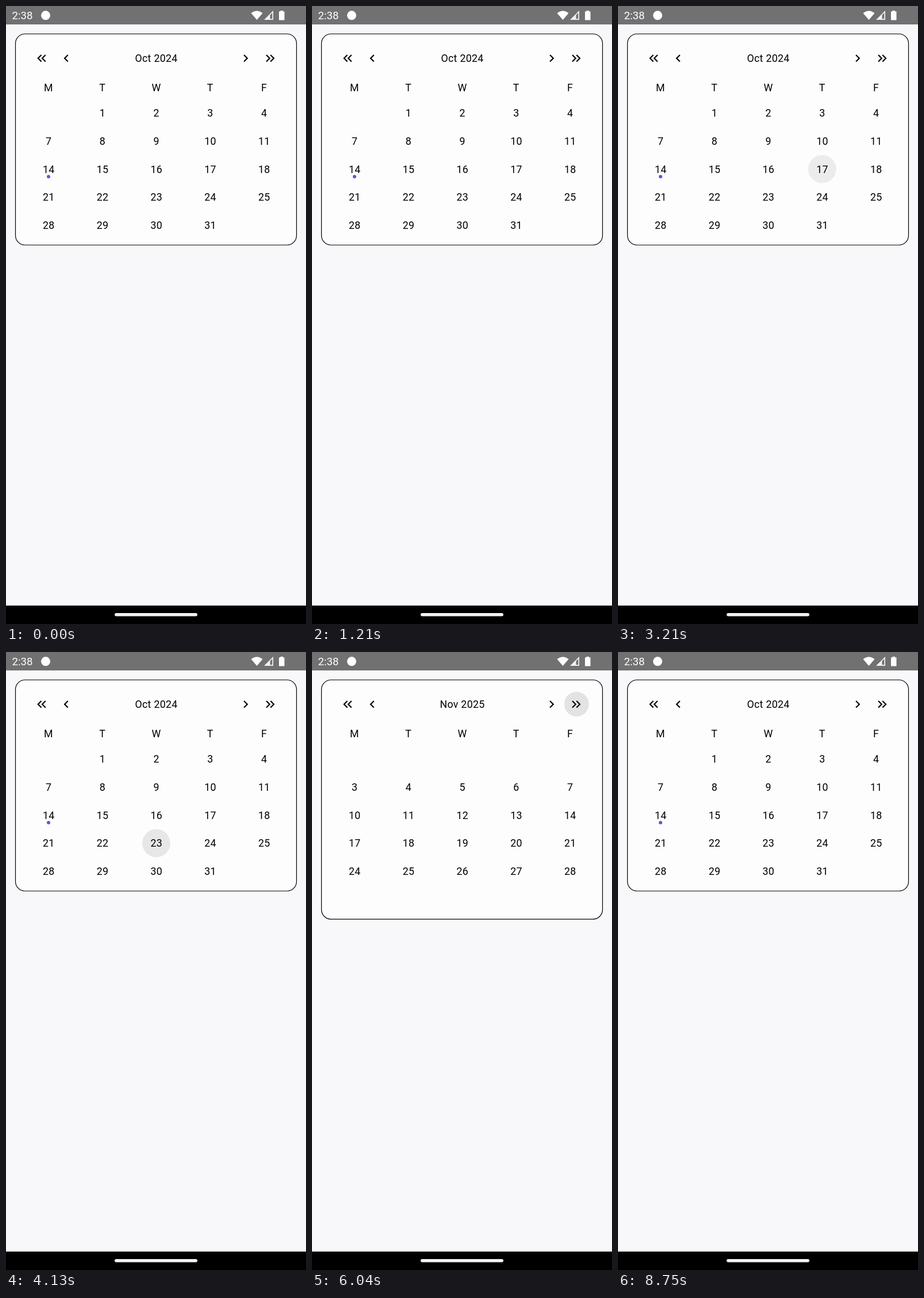
An HTML page that plays this animation: 522 by 1073 pixels, repeating every 8870 ms.

```html
<!DOCTYPE html>
<html lang="en">
<head>
<meta charset="utf-8">
<title>Weekday calendar</title>
<style>
  html, body { margin: 0; width: 100%; height: 100%; overflow: hidden; background: #f8f8fb; }
  svg { display: block; width: 522px; height: 1073px; font: 17.8px Roboto, sans-serif; }
  #calendar text { text-anchor: middle; letter-spacing: .3px; }
</style>
</head>
<body>
<svg viewBox="0 0 522 1073">
  <rect width="522" height="1073" fill="#f8f8fb"/>
  <rect width="522" height="32" fill="#717171"/>
  <g fill="#fff">
    <text x="10.5" y="22.7" font-size="18.6">2:38</text>
    <circle cx="69" cy="16.3" r="8"/>
    <path d="M426.5 12.5Q436.500 4.500 446.500 12.500L436.500 24Z"/>
    <path fill-rule="evenodd" d="M465 8V24H449ZM463.300 12L459.500 15.800V22.300H463.300Z" opacity=".9"/>
    <path d="M477.500 9.500V8H482V9.500H484.500V24.500H475V9.500Z"/>
  </g>
  <g id="calendar"></g>
  <rect y="1041" width="522" height="32" fill="#000"/>
  <rect x="189" y="1054" width="144" height="5.500" rx="2.750" fill="#f4f2f2"/>
</svg>
<script>
const LOOP = 8870;
const FADE = 300;
const ACCENT = '#9780f2';
const ROW = 48.8;
const FIRST_ROW = 185.5;
const columnX = weekday => 74 + (weekday - 1) * 93.75;
const rowY = row => FIRST_ROW + row * ROW;

// Each tap: press time, release time, and a day of October 2024 or a control.
const taps = [
  [2240, 2360, 17], [3000, 3110, 17],
  [3440, 3560, 23], [3960, 4090, 23],
  [4480, 4600, 10],
  [4850, 4960, 'nextYear'], [5380, 5490, 'nextMonth'], [5960, 6080, 'nextYear'],
  [6660, 6770, 'title'],
  [7540, 7650, 10]
];
const HOME = 2024 * 12 + 9;

const circle = (x, y, r, attrs) => `<circle cx="${x}" cy="${y}" r="${r}" ${attrs}/>`;
const label = (x, y, text, color = '#000') =>
  `<text x="${x}" y="${y + 6.4}" fill="${color}">${text}</text>`;

function chevrons(x, direction, count) {
  const offsets = count === 2 ? [-3.4, 3.2] : [0];
  return offsets.map(dx =>
    `<path transform="translate(${x + dx * 1.1} 90.700) scale(${direction * 1.08} 1.080)"
      d="M-3.7 -4.600L-2.300 -6L3.700 0L-2.300 6L-3.700 4.600L.9 0Z"/>`).join('');
}

function stateAt(time) {
  let month = HOME, selected = null;
  for (const [, release, target] of taps) {
    if (time < release) break;
    if (target === 'nextYear') month += 12;
    else if (target === 'nextMonth') month += 1;
    else if (target === 'title') month = HOME;
    else selected = selected === target ? null : target;
  }
  return { month, selected };
}

function ripple([press, release, target], time) {
  if (time < press || time > release + FADE) return '';
  const rise = Math.min(1, (time - press) / 75);
  const fall = Math.min(1, 1 - (time - release) / FADE);
  const fill = `fill="#000" opacity="${0.1 * rise * fall}"`;
  if (target === 'title') return `<rect x="214.500" y="58" width="93.500" height="65" rx="10" ${fill}/>`;
  if (target === 'nextMonth') return circle(417.5, 90.5, 21.5, fill);
  if (target === 'nextYear') return circle(460.3, 90.5, 21.5, fill);
  const slot = target + 1;
  return circle(columnX(slot % 7), rowY(Math.floor(slot / 7)), 24.4, fill);
}

function calendar(time) {
  const { month, selected } = stateAt(time);
  const year = Math.floor(month / 12), index = month % 12;
  const firstWeekday = new Date(year, index, 1).getDay();
  const days = new Date(year, index + 1, 0).getDate();
  const rows = Math.ceil((firstWeekday + days) / 7);
  const name = new Date(year, index, 1).toLocaleString('en-US', { month: 'short' });

  let out = `<rect x="16.500" y="48.500" width="489" height="${122.5 + rows * ROW}" rx="16.500"
    fill="#fdfdfd" stroke="#000" stroke-width="1.200"/>`;
  out += chevrons(62, -1, 2) + chevrons(104.5, -1, 1) + chevrons(417.3, 1, 1) + chevrons(460, 1, 2);
  out += label(261.5, 90.5, `${name} ${year}`);
  [...'MTWTF'].forEach((letter, i) => out += label(columnX(i + 1), 142, letter));

  for (let day = 1; day <= days; day++) {
    const slot = firstWeekday + day - 1, weekday = slot % 7;
    if (weekday === 0 || weekday === 6) continue;
    const x = columnX(weekday), y = rowY(Math.floor(slot / 7));
    const active = month === HOME && day === selected;
    if (active) out += circle(x, y, 24.4, `fill="${ACCENT}"`);
    out += label(x + .2, y, day, active ? '#fff' : '#000');
    if (month === HOME && day === 14) out += circle(x, 296.3, 3, 'fill="#6c52d2"');
  }
  return out + taps.map(tap => ripple(tap, time)).join('');
}

const stage = document.getElementById('calendar');
let shown = '';
function draw() {
  const markup = calendar(performance.now() % LOOP);
  if (markup !== shown) stage.innerHTML = shown = markup;
  requestAnimationFrame(draw);
}
draw();
</script>
</body>
</html>
```
